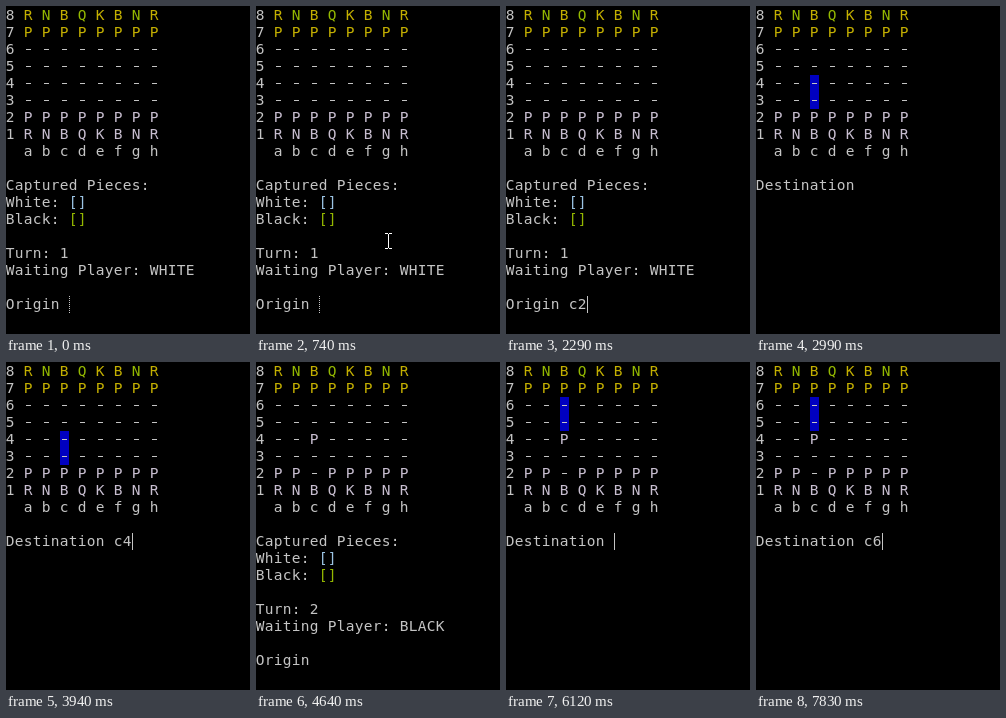
Animation of 244 by 328 pixels, one loop 8000 ms. Source, as an HTML page with a canvas:

```html
<!DOCTYPE html>
<html lang="en">
<head>
<meta charset="utf-8">
<title>Terminal chess</title>
<style>
  html, body { margin: 0; width: 100%; height: 100%; overflow: hidden; background: #000; }
  canvas { display: block; }
</style>
</head>
<body>
<canvas id="stage" width="244" height="328"></canvas>
<script>
const ctx = document.getElementById('stage').getContext('2d');
const LOOP = 8000, CELL = 9, LINE = 17;
const GRAY = '#c4c4c4', WHITE = '#c8bed0', GOLD = '#c4b000', LIME = '#94b800', BLUE = '#0000c0';
const rowTop = row => 1 + row * LINE;

// Each step: start time, screen, typed text, whether the caret shows.
const steps = [
  [0, 0, '', true], [1740, 0, '', false], [2140, 0, 'c', true], [2290, 0, 'c2', true],
  [2440, 1, '', true], [2990, 1, '', false], [3540, 1, '', true], [3710, 1, 'c', true], [3940, 1, 'c4', true],
  [4160, 2, '', true], [4640, 2, '', false], [5190, 2, '', true], [5650, 2, 'c', true], [5800, 2, 'c7', true],
  [6120, 3, '', true], [6670, 3, '', false], [7200, 3, '', true], [7600, 3, 'c', true], [7830, 3, 'c6', true]
];

const opening = ['RNBQKBNR', 'PPPPPPPP', '--------', '--------',
                 '--------', '--------', 'PPPPPPPP', 'RNBQKBNR'];
const moved = opening.slice();
moved[4] = '--P-----';
moved[6] = 'PP-PPPPP';

const screens = [
  { board: opening, turn: 1, player: 'WHITE' },
  { board: opening, marks: [4, 5] },
  { board: moved, turn: 2, player: 'BLACK' },
  { board: moved, marks: [2, 3] }
];

// Pointer keyframes: time, x, y.
const pointerPath = [[360, 205, 320], [590, 158, 230], [820, 78, 244], [1000, 92, 282],
                     [1130, 114, 298], [1280, 114, 298], [1505, 203, 312]];

function rect(x, y, w, h, color) {
  ctx.fillStyle = color;
  ctx.fillRect(x, y, w, h);
}

function print(text, col, row, color = GRAY) {
  [...text].forEach((char, i) => {
    const x = (col + i) * CELL;
    if (char === '-') return rect(x + 2, rowTop(row) + 8, 5, 1, color);
    ctx.fillStyle = color;
    ctx.fillText(char, x + 4, rowTop(row) + 13);
  });
}

function drawBoard({ board, marks = [] }) {
  marks.forEach(row => rect(6 * CELL, rowTop(row), CELL, LINE, BLUE));
  board.forEach((line, row) => {
    print(String(8 - row), 0, row);
    [...line].forEach((piece, file) => {
      let color = WHITE;
      if (piece === '-') color = GRAY;
      else if (row < 2) color = 'NQ'.includes(piece) ? LIME : GOLD;
      print(piece, 2 + file * 2, row, color);
    });
  });
  print('a b c d e f g h', 2, 8);
}

function drawStatus({ turn, player }) {
  print('Captured Pieces:', 0, 10);
  print('White:', 0, 11);
  print('[]', 7, 11, '#9cc4e4');
  print('Black:', 0, 12);
  print('[]', 7, 12, LIME);
  print('Turn: ' + turn, 0, 14);
  print('Waiting Player: ' + player, 0, 15);
}

function drawCaret(col, row, focused) {
  const x = col * CELL, y = rowTop(row);
  if (focused) return rect(x, y, 1, LINE, GRAY);
  for (let dy = 0; dy < LINE; dy += 2) rect(x, y + dy, 1, 1, GRAY);
}

function pointerAt(t) {
  const next = pointerPath.findIndex(point => point[0] > t);
  if (next < 0) return pointerPath.at(-1).slice(1);
  const [t0, x0, y0] = pointerPath[Math.max(0, next - 1)];
  const [t1, x1, y1] = pointerPath[next];
  const k = Math.max(0, (t - t0) / (t1 - t0));
  return [Math.round(x0 + (x1 - x0) * k), Math.round(y0 + (y1 - y0) * k)];
}

function drawPointer(t) {
  if (t < 360 || t >= 2140) return;
  const tick = 76.3;
  const [x, y] = pointerAt(360 + Math.floor((t - 360) / tick) * tick);
  if (t >= 1199 && t < 1280) {
    ctx.fillStyle = '#787800';
    ctx.beginPath();
    ctx.arc(x - 2, y - 1, 12, 0, Math.PI * 2);
    ctx.fill();
  }
  rect(x, y - 7, 1, 14, '#fff');
  for (const edge of [y - 8, y + 7]) {
    rect(x - 3, edge, 3, 1, '#fff');
    rect(x + 1, edge, 3, 1, '#fff');
  }
}

function draw(now) {
  const t = now % LOOP;
  const [, index, typed, caret] = steps.findLast(step => step[0] <= t);
  const screen = screens[index];
  rect(0, 0, 244, 328, '#000');
  ctx.font = '14.5px "DejaVu Sans Mono", monospace';
  ctx.textAlign = 'center';
  drawBoard(screen);
  if (screen.turn) drawStatus(screen);
  const prompt = (screen.turn ? 'Origin ' : 'Destination ') + typed;
  const row = screen.turn ? 17 : 10;
  print(prompt, 0, row);
  if (caret) drawCaret(prompt.length, row, t >= 1199);
  drawPointer(t);
}

const start = performance.now();
function frame() {
  draw(performance.now() - start);
  requestAnimationFrame(frame);
}
frame();
</script>
</body>
</html>
```
